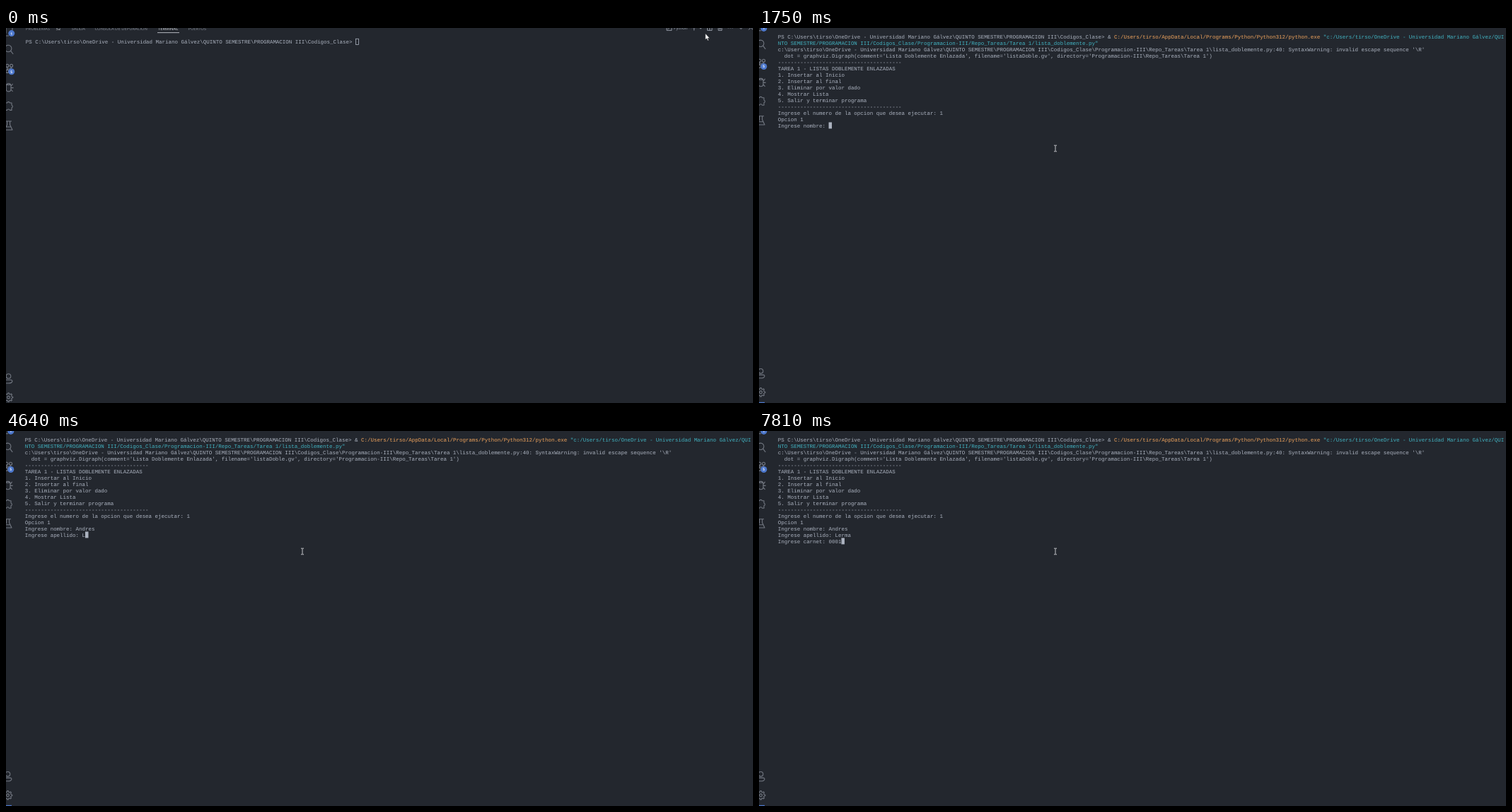
An HTML page for the animation above (8 s loop, 1056 px wide and 531 px high).

```html
<!DOCTYPE html>
<html lang="es">
<head>
<meta charset="utf-8">
<title>Terminal</title>
<style>
html, body { margin: 0; width: 100%; height: 100%; overflow: hidden; background: #23272e; }
svg { display: block; width: 1056px; height: 531px; }
text { white-space: pre; text-rendering: geometricPrecision; }
#term text { font: 7.47px "Liberation Mono", monospace; fill: #abb2bf; }
#term .cmd { fill: #f0a45d; }
#term .str { fill: #42b3c2; }
.ui text { font: 5.87px "Open Sans", sans-serif; fill: #858a94; }
.ui .on { fill: #d7dae0; }
.icons { fill: none; stroke: #737882; stroke-width: 1.1; stroke-linejoin: round; }
.tools { fill: none; stroke: #abb2bf; stroke-width: .8; }
.badge circle { fill: #4d78cc; }
.badge text { font: bold 5px "Open Sans", sans-serif; fill: #f8fafd; text-anchor: middle; }
</style>
</head>
<body>
<svg viewBox="0 0 1056 531">
  <g id="view">
    <!-- panel header, placed in the second view's coordinates -->
    <g class="ui" transform="translate(-1 -7.2)">
      <text x="28" y="2.6">PROBLEMAS</text>
      <text x="70.6" y="2.6" class="on">52</text>
      <text x="92.5" y="2.6">SALIDA</text>
      <text x="125.5" y="2.6">CONSOLA DE DEPURACIÓN</text>
      <text x="215" y="2.6" class="on">TERMINAL</text>
      <text x="257.5" y="2.6">PUERTOS</text>
      <path d="M214 6.6H245" stroke="#d7dae0" stroke-width=".8"/>
      <text x="944" y="2.4" style="fill:#abb2bf">Python</text>
      <g class="tools">
        <path d="M934-4H941V3.4H934ZM935.5-2L937.5 0L935.5 2M972.7-4V3.5M969-.4H976"/>
        <path d="M980-.8L982 1.2L984-.8M991.5-4V3.4H998V-4M994.8-4V3.4"/>
        <path d="M1007-4V3.4H1012V-4M1008.8-2V2M1010.2-2V2"/>
        <path d="M1020.5 0H1021.7M1023.4 0H1024.6M1026.3 0H1027.5M1036.5-1L1039 1.4L1041.5-1M1050-4L1056 2.5M1056-4L1050 2.5"/>
      </g>
    </g>
    <g transform="translate(-1 -7.2)">
      <g class="icons">
        <path d="M9-3V3M0-3V7.5M-2 11H4"/>
        <circle cx="3.2" cy="29" r="4.7"/><path d="M6.6 32.4L10.2 37"/>
        <circle cx="1.8" cy="53.4" r="2"/><circle cx="7.6" cy="53.4" r="2"/><circle cx="1.8" cy="61.4" r="2"/>
        <path d="M1.8 55.4V59.4M7.6 55.4Q7.6 58 5 58H1.8"/>
        <path d="M.2 82A3.4 3.4 0 0 1 7 82V86.5A3.4 3.4 0 0 1 .2 86.5ZM1 80.5H6.4M7 82.5L9.6 79M7 84.6H10.6M7 87L9.6 90M0 84.6H-2"/>
        <path d="M-2 106H1.6A2 2 0 0 1 5.4 106H8V109.2A2 2 0 0 1 8 113V116.4H5.4A2 2 0 0 0 1.6 116.4H-2"/>
        <path d="M-1 132H8M1.6 132V137L-2 144.2H9L5.6 137V132M0 140H7.4"/>
        <circle cx="3.5" cy="493" r="3.3"/><path d="M-2 498.3H6.6Q9.2 498.3 8.8 500.5Q8 503 3.5 503H-1"/>
        <circle cx="3.5" cy="523" r="1.9"/><path id="gear"/>
      </g>
      <g class="badge">
        <circle cx="7.8" cy="7.6" r="4.5"/><text x="7.8" y="9.5">1</text>
        <circle cx="7.8" cy="61.7" r="4.5"/><text x="7.8" y="63.6">5</text>
      </g>
      <path d="M0 537H9V545H0Z" fill="#4d78cc"/>
    </g>
    <g id="term"></g>
    <rect id="idle" y="8.1" width="3.9" height="8.2" fill="none" stroke="#abb2bf" stroke-width=".8"/>
    <rect id="block" width="4.5" height="9" fill="#abb2bf"/>
  </g>
  <path id="arrow" d="M0 0V8.8L2 7L3.4 10.2L4.8 9.6L3.5 6.6H6.2Z" fill="#fff" stroke="#15181c" stroke-width=".5"/>
  <path id="beam" d="M-2-4.3H-.6L0-3.8L.6-4.3H2M0-3.8V3.8M-2 4.3H-.6L0 3.8L.6 4.3H2" fill="none" stroke="#d8dade" stroke-width=".9"/>
</svg>
<script>
const LOOP = 8000, CUT = 1750;
const COL = 7.47 * 0.6001, ROW = 8.97, LEFT = 26.8, BASE = 15;
const raw = String.raw;
const $ = id => document.getElementById(id);
const make = (tag, parent) =>
  parent.appendChild(document.createElementNS("http://www.w3.org/2000/svg", tag));
const show = (el, on) => el.style.display = on ? "" : "none";
const place = (el, x, y) => el.setAttribute("transform", `translate(${x} ${y})`);

function write(row, text, col = 0, cls = "") {
  const el = make("text", $("term"));
  el.setAttribute("x", LEFT + col * COL);
  el.setAttribute("y", BASE + row * ROW);
  el.setAttribute("class", cls);
  el.textContent = text;
  return el;
}

const home = raw`C:\Users\tirso\OneDrive - Universidad Mariano Gálvez\QUINTO SEMESTRE\PROGRAMACION III\Codigos_Clase`;
const prompt = `PS ${home}> `;
const exe = "C:/Users/tirso/AppData/Local/Programs/Python/Python312/python.exe";
const script = raw`\Programacion-III\Repo_Tareas\Tarea 1\lista_doblemente.py`;
const lower = home.replace("C", "c");
const quoted = `"${(lower + script).replaceAll("\\", "/")}"`;
const rule = "-".repeat(39);

write(0, prompt);
$("idle").setAttribute("x", LEFT + prompt.length * COL + .5);

const exeCol = prompt.length + 2, strCol = exeCol + exe.length + 1, wrap = 229 - strCol;
const output = [
  write(0, "&", prompt.length),
  write(0, exe, exeCol, "cmd"),
  write(0, quoted.slice(0, wrap), strCol, "str"),
  write(1, quoted.slice(wrap), 0, "str"),
  ...[
    lower + script + raw`:40: SyntaxWarning: invalid escape sequence '\R'`,
    raw`  dot = graphviz.Digraph(comment='Lista Doblemente Enlazada', filename='listaDoble.gv', directory='Programacion-III\Repo_Tareas\Tarea 1')`,
    rule,
    "TAREA 1 - LISTAS DOBLEMENTE ENLAZADAS",
    "1. Insertar al Inicio",
    "2. Insertar al final",
    "3. Eliminar por valor dado",
    "4. Mostrar Lista",
    "5. Salir y terminar programa",
    rule,
    "Ingrese el numero de la opcion que desea ejecutar: 1",
    "Opcion 1"
  ].map((line, i) => write(i + 2, line))
];

// each question: when it appears and when each key is pressed
const fields = [
  { label: "Ingrese nombre: ", answer: "Andres", at: CUT, keys: [1830, 1980, 2070, 2160, 2250, 2430] },
  { label: "Ingrese apellido: ", answer: "Lerma", at: 3270, keys: [4640, 5200, 5320, 5470, 5650] },
  { label: "Ingrese carnet: ", answer: "0001", at: 5900, keys: [6550, 6730, 6850, 7810] }
].map((f, i) => ({ ...f, row: 14 + i, el: write(14 + i, "") }));

let teeth = "";
for (let i = 0; i < 32; i++) {
  const a = (i - .5) * Math.PI / 16, r = i % 4 < 2 ? 6.3 : 4.7;
  teeth += `${i ? "L" : "M"}${3.5 + r * Math.cos(a)} ${523 + r * Math.sin(a)}`;
}
$("gear").setAttribute("d", teeth + "Z");

const mix = (a, b, k) => a + (b - a) * k;
const smooth = k => k * k * (3 - 2 * k);
// progress in even jumps: first jump at `from`, complete at `to`
const jumps = (t, from, to, n) =>
  t < from ? 0 : Math.min(n, 1 + Math.floor((t - from) * (n - 1) / (to - from) + 1e-6)) / n;

function pointer(t) {
  if (t >= CUT) return { beam: true, x: 419, y: 170.5 };
  if (t < 320) {
    const k = smooth(jumps(t, 40, 320, 9));
    return { x: mix(988.6, 1028, k), y: mix(7.8, -11, k) };
  }
  if (t < 1000 || t >= 1410) return null;
  const k = smooth(jumps(t, 1000, 1410, 12)), y = mix(-10, 540, k);
  return { beam: y > 12, x: mix(1030, 1011, k), y };
}

function draw(t) {
  const running = t >= CUT;
  place($("view"), running ? 0 : 1, running ? 0 : 7.2);
  output.forEach(el => show(el, running));
  show($("idle"), !running);
  show($("block"), running);

  for (const f of fields) {
    const open = t >= f.at;
    show(f.el, open);
    if (!open) continue;
    const line = f.label + f.answer.slice(0, f.keys.filter(k => k <= t).length);
    if (f.el.textContent !== line) f.el.textContent = line;
    place($("block"), LEFT + line.length * COL, BASE + f.row * ROW - 7.1);
  }

  const p = pointer(t);
  show($("arrow"), p && !p.beam);
  show($("beam"), p && p.beam);
  if (p) place($(p.beam ? "beam" : "arrow"), p.x, p.y);
}

const start = performance.now();
function tick() {
  draw((performance.now() - start) % LOOP);
  requestAnimationFrame(tick);
}
draw(0);
requestAnimationFrame(tick);
</script>
</body>
</html>
```
